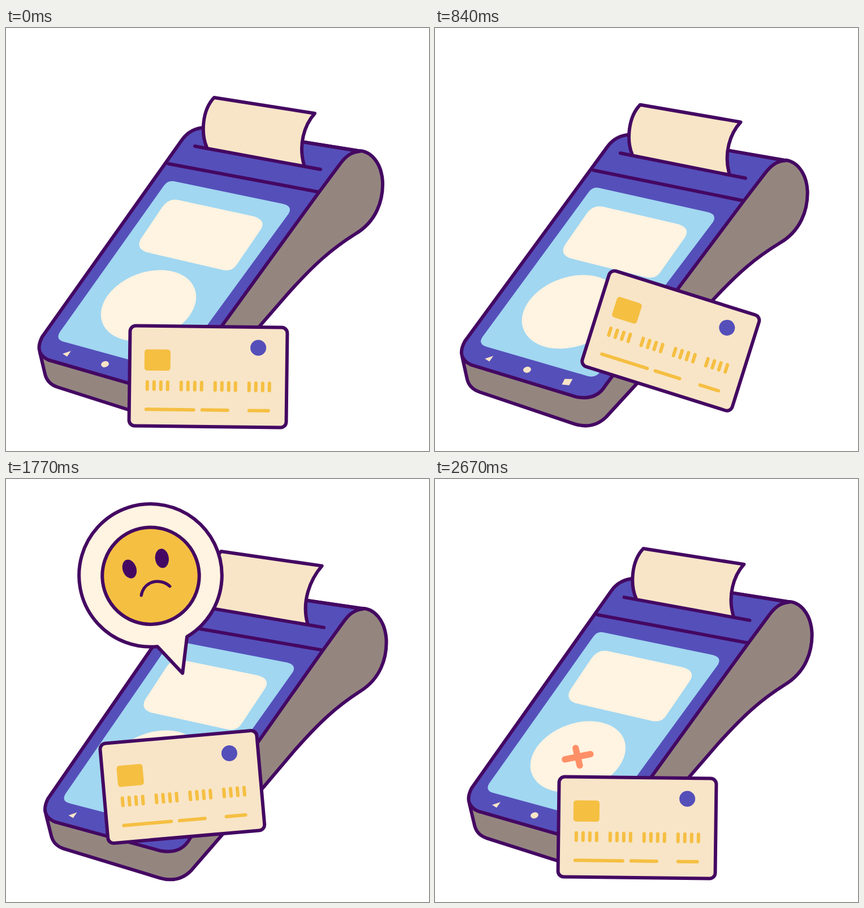
An HTML page for the animation above (2700 ms loop, 748 px wide and 748 px high).

```html
<!DOCTYPE html>
<html lang="en">
<head>
<meta charset="utf-8">
<title>Declined payment</title>
<style>
  html, body { margin: 0; width: 100%; height: 100%; overflow: hidden; background: #fff; }
  svg { display: block; width: 100%; height: 100%; }
  .ink { stroke: #440862; stroke-width: 6; stroke-linecap: round; stroke-linejoin: round; }
  .line { fill: none; }
  .blue { fill: #554fba; }
  .grey { fill: #94867f; }
  .paper { fill: #f8e5c7; }
  .cream { fill: #fff3e1; }
  .sky { fill: #a1d7f1; }
  .gold { fill: #f5bf42; }
  .eye { fill: #440862; }
  #print { stroke: #f5bf42; stroke-width: 6; stroke-linecap: round; fill: none; }
  #cross { stroke: #ff8f66; stroke-linecap: round; fill: none; }
</style>
</head>
<body>
<svg viewBox="0 0 748 748">
  <g id="terminal">
    <path class="ink grey" d="M60 574L69 612Q73 629 91 635L260 689Q293 699 316 676L447 529L500 468C545 418 575 391 618 364C655 342 667 305 666 272C664 238 645 217 623 217L528 202Z"/>
    <path class="ink blue" d="M64 546L311 198Q326 177 352 176L528 202L626 218C610 219 600 228 591 240L553 291L314 620Q298 648 262 641L75 587Q49 575 64 546Z"/>
    <path class="ink line" d="M287 240L553 290"/>
    <path class="ink paper" id="receipt"/>
    <path class="ink line" d="M334 209L556 250"/>
    <path class="sky" d="M297 271L490 311Q507 315 500 328L305 595Q297 608 282 604L103 555Q87 551 95 538L279 279Q286 269 297 271Z"/>
    <path class="cream" d="M304 304L438 333Q461 340 450 357L409 417Q401 431 384 428L247 396Q229 389 239 372L276 317Q287 301 304 304Z"/>
    <ellipse class="cream" id="disc" rx="87" ry="59"/>
    <path id="cross"/>
    <path class="paper" d="M100 576L115 571L108 581ZM241.7 609.8L255.7 609.8L249.7 620.8L236.7 619.8Z"/>
    <ellipse class="paper" cx="175" cy="594.5" rx="7" ry="5.3" transform="rotate(-15 175 594.5)"/>
  </g>
  <g id="bubble">
    <path class="ink cream" d="M267 291A126 126 0 1 1 320 276L309.5 340Z"/>
    <circle class="ink gold" cx="260.5" cy="166" r="85.5"/>
    <ellipse class="eye" id="eyeL" rx="12"/>
    <ellipse class="eye" id="eyeR" rx="12"/>
    <path class="ink line" id="mouth" d="M242 213C248 185 280 178 300 197"/>
  </g>
  <g id="card">
    <rect class="ink paper" x="-139" y="-88.5" width="278" height="177" rx="10"/>
    <rect class="gold" x="-113" y="-47" width="46" height="37.5" rx="5"/>
    <circle class="blue" cx="88" cy="-52" r="14"/>
    <path id="print"/>
  </g>
</svg>
<script>
const LOOP = 2700, STEP = 30;
const $ = id => document.getElementById(id);
const put = (id, value) => $(id).setAttribute("transform", value);
const progress = (t, a, b) => Math.min(1, Math.max(0, (t - a) / (b - a)));

function drawReceipt(k) {
  const x = 8 * k, y = -10 * k;
  $("receipt").setAttribute("d",
    `M355 211C345 ${188 + y / 3} ${346 + x * 0.7} ${146 + y * 0.7} ${368 + x} ${123 + y}` +
    `L${546 + x} ${151 + y}C${527 + x * 0.7} ${172 + y * 0.7} 517 ${207 + y / 3} 527 242`);
}

// Two arms turned within the tilted plane of the screen.
function drawCross(k) {
  const turn = 44 * (k - 0.5) * Math.PI / 180, scale = 2.05 * k;
  const c = scale * Math.cos(turn), s = scale * Math.sin(turn);
  const arm = (p, q) => {
    const x = 22 * p - 3.5 * q, y = -4.5 * p - 15 * q;
    return `M${251.5 - x} ${491 - y}L${251.5 + x} ${491 + y}`;
  };
  $("cross").setAttribute("d", k > 0.01 ? arm(c, s) + arm(-s, c) : "");
  $("cross").setAttribute("stroke-width", 11 * scale);
}

function drawEye(id, x, y, ry, tilt) {
  $(id).setAttribute("ry", ry);
  put(id, `translate(${x} ${y}) rotate(${tilt})`);
}

function draw(t) {
  const ease = (a, b) => (1 - Math.cos(Math.PI * progress(t, a, b))) / 2;
  const bump = (a, b) => Math.sin(Math.PI * progress(t, a, b));

  // Terminal floats on one sine per loop.
  const phase = 2 * Math.PI * t / LOOP, sway = Math.sin(phase);
  put("terminal", `translate(${-9.5 * sway} ${9.5 * (1 - Math.cos(phase))}) rotate(${0.93 * sway} 392 374)`);
  drawReceipt(ease(1350, 1700) - ease(2070, 2400));
  put("disc", `translate(252 491) rotate(-20) scale(${1 + 0.04 * bump(540, 1140)})`);
  drawCross(ease(1350, 1700) - ease(2500, 2840));

  // Card: swing out, tap, sink, return.
  const out = ease(0, 550), tap = ease(540, 1130), back = ease(2070, 2660);
  const x = 357.5 + 164 * out - 204 * tap - 9 * ease(1350, 2070) + 49 * back;
  const y = 616.5 - 48.5 * out - 29 * tap + 77.5 * ease(1650, 2350) + 22 * bump(540, 800);
  const angle = 0.7 + 27.5 * ease(0, 650) - 30.5 * ease(650, 1120)
    - 2.7 * ease(1350, 1750) + 10.1 * ease(1780, 2070) - 4.4 * back;
  put("card", `translate(${x} ${y}) rotate(${angle})`);

  // Bubble pops from its tip, leaning less as it settles.
  const lean = (1 - progress(t, 1050, 2070)) ** 2;
  const size = (1 + 0.03 * lean) * (ease(1050, 1280) - ease(2300, 2560));
  const tipY = 336.5 + 7 * ease(1350, 1700) - 12 * ease(1800, 2400);
  $("bubble").style.display = size > 0.01 ? "" : "none";
  put("bubble", `translate(${309.5 + 31 * lean} ${tipY}) rotate(${-27 * lean}) scale(${size}) translate(-309.5 -340)`);

  const open = ease(1450, 1720), raised = open - ease(1800, 2070);
  const ry = 2 + 11 * open + 4 * raised, lift = -5 * raised;
  drawEye("eyeL", 226 + lift / 2, 157.5 + lift, ry, -26 + 21 * open - 12 * raised);
  drawEye("eyeR", 284 + lift / 2, 141 + lift, ry, -3 - 2 * raised);
  put("mouth", `translate(${270 - 3 * raised} ${195 - 11 * raised}) scale(${1 - 0.12 * raised}) translate(-270 -195)`);
}

let print = "M-109 59H-25M-10 59H35M73 59H107";
for (let i = 0; i < 16; i++)
  print += `M${-107.5 + 12 * (i % 4) + 60 * Math.floor(i / 4)} 10.5v13`;
$("print").setAttribute("d", print);

const start = performance.now();
function tick() {
  const t = (performance.now() - start) % LOOP;
  draw(Math.floor(t / STEP) * STEP);
  requestAnimationFrame(tick);
}
tick();
</script>
</body>
</html>
```
